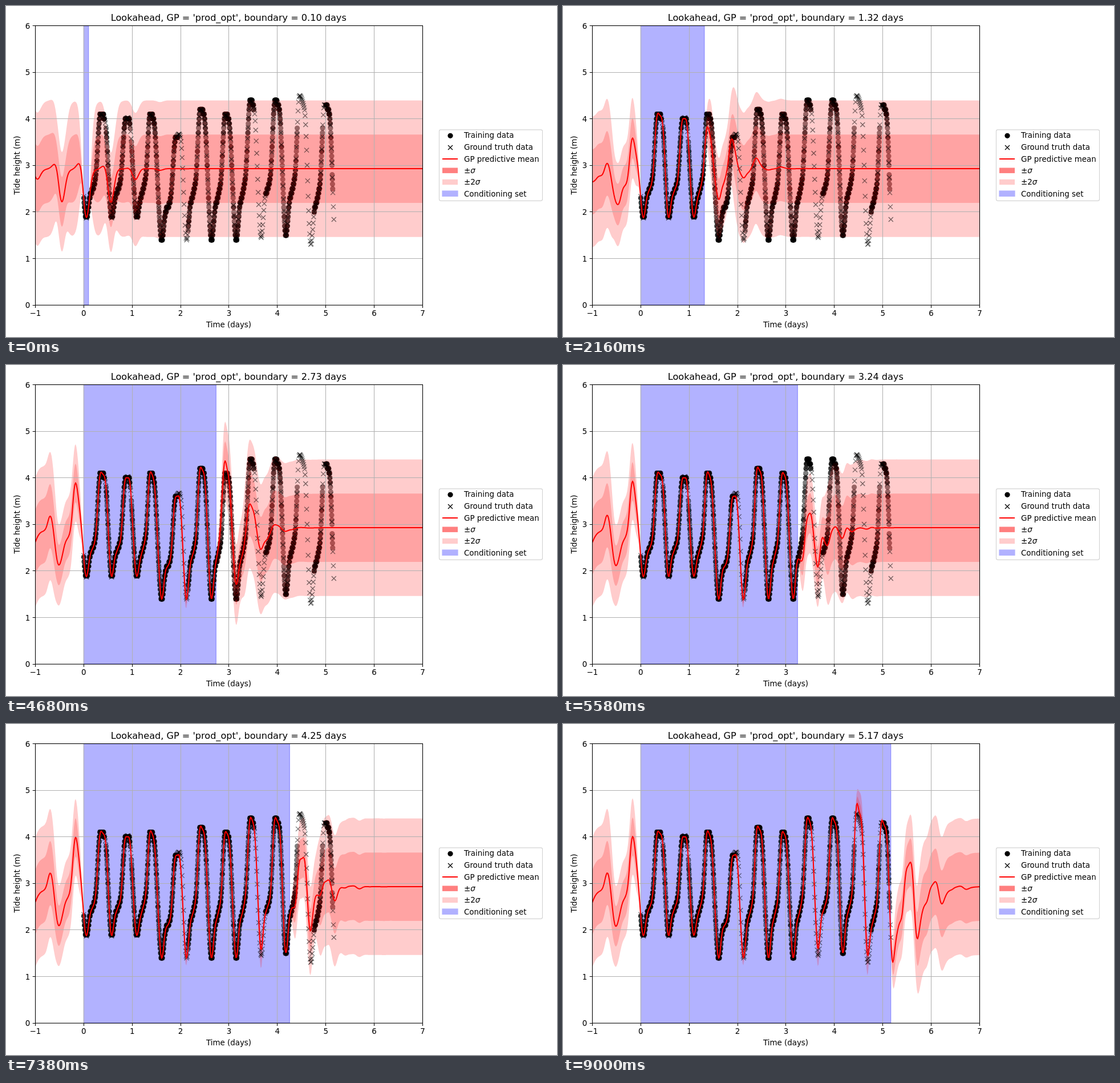
An HTML page with a canvas that plays this animation: 966 by 580 pixels, repeating every 9090 ms.

```html
<!DOCTYPE html>
<html lang="en">
<head>
<meta charset="utf-8">
<title>Tide height lookahead</title>
<style>
  html, body { margin: 0; width: 100%; height: 100%; overflow: hidden; background: #fff; }
  canvas, svg { position: absolute; left: 0; top: 0; width: 966px; height: 580px; }
  text { font: 13.42px "DejaVu Sans", sans-serif; fill: #000; }
  .mid { text-anchor: middle; }
  .end { text-anchor: end; }
  #title { font-size: 16.1px; }
  .it { font-style: oblique; }
</style>
</head>
<body>
<canvas id="plot" width="966" height="580"></canvas>
<svg id="frame" viewBox="0 0 966 580">
  <rect x="51.5" y="34.5" width="679" height="489.7" fill="none" stroke="#000" stroke-width="1.07"/>
  <path id="ticks" stroke="#000" stroke-width="1.07"/>
  <g id="labels"></g>
  <text id="title" class="mid" x="390.3" y="26"></text>
  <text class="mid" x="390.5" y="562.6">Time (days)</text>
  <text class="mid" transform="translate(24 279) rotate(-90)">Tide height (m)</text>
  <rect x="759.5" y="216.8" width="181" height="124.5" rx="2.7" fill="#fff" stroke="#d4d4d4" stroke-width="1.2"/>
  <circle cx="779" cy="227.3" r="4.6"/>
  <path d="M775 244l8 8m0-8l-8 8" stroke="#000" stroke-width="1.3"/>
  <path d="M765 268h27" stroke="#f00" stroke-width="2"/>
  <rect x="765" y="283.5" width="27" height="9.4" fill="#ff7f7f"/>
  <rect x="765" y="303.8" width="27" height="9.4" fill="#fcc"/>
  <rect x="765" y="324" width="27" height="9.4" fill="#00f" stroke="#00f" stroke-width="1.2" opacity=".3"/>
  <text x="803" y="231.4">Training data</text>
  <text x="803" y="252.3">Ground truth data</text>
  <text x="803" y="272.6">GP predictive mean</text>
  <text x="803" y="292.9">±<tspan class="it">σ</tspan></text>
  <text x="803" y="313.2">±2<tspan class="it">σ</tspan></text>
  <text x="803" y="333.5">Conditioning set</text>
</svg>
<script>
const W = 966, H = 580, LEFT = 51.4, TOP = 34.5, RIGHT = 730.4, BOTTOM = 524.2;
const STEP = 90, STEPS = 101, FIRST = 0.1, LAST = 5.166;
const X = t => LEFT + (t + 1) * (RIGHT - LEFT) / 8;
const Y = h => BOTTOM - h * (BOTTOM - TOP) / 6;
const snap = v => Math.floor(v) + .5;

// One tide per row: low time, low, shoulder, late shoulder,
// peak time, peak, end of stand, height there.
const tides = [
  [-.46, 1.8, 2.35, 2.65, -.17, 4, -.11, 3.9],
  [.055, 1.87, 2.38, 2.7, .345, 4.1, .445, 3.93],
  [.575, 1.87, 2.36, 2.68, .865, 4, .945, 3.95],
  [1.095, 1.88, 2.32, 2.75, 1.37, 4.1, 1.45, 3.95],
  [1.61, 1.4, 2.02, 2.3, 1.9, 3.6, 2, 3.6],
  [2.125, 1.4, 2.2, 2.65, 2.405, 4.2, 2.49, 4.05],
  [2.64, 1.4, 2.15, 2.6, 2.92, 4.08, 3, 3.95],
  [3.15, 1.4, 2.2, 2.7, 3.44, 4.4, 3.52, 4.2],
  [3.665, 1.45, 2.35, 2.72, 3.95, 4.38, 4.04, 4.2],
  [4.175, 1.5, 2.3, 2.75, 4.455, 4.5, 4.56, 4.2],
  [4.69, 1.3, 2.1, 2.55, 4.97, 4.3, 5.075, 4.1]
];
const knots = tides.flatMap(([t, low, a, b, tp, hi, te, end]) => [
  [t, low, 0], [t + .085, a, 3], [t + .185, b, 6], [tp, hi, 0], [te, end, -5]
]).concat([[5.2, 1.4, 0]]);

// Cubic Hermite curve through the knots.
function tide(t) {
  let i = 0;
  while (i < knots.length - 2 && knots[i + 1][0] < t) i++;
  const [t0, y0, m0] = knots[i], [t1, y1, m1] = knots[i + 1];
  const d = t1 - t0, u = (t - t0) / d, v = 1 - u;
  return y0 * v * v * (1 + 2 * u) + y1 * u * u * (3 - 2 * u)
    + d * u * v * (m0 * v - m1 * u);
}

// Periods without sensor readings.
const gaps = [[.43, .46], [.96, .985], [1.94, 2.155], [3.515, 3.755],
  [4.41, 4.755], [4.935, 5], [5.145, 6]];
const samples = Array.from({ length: 1490 }, (_, i) => i / 288)
  .map(t => [t, tide(t)]);
const truth = samples.filter((_, i) => i % 3 === 0);
const training = samples
  .filter(([t]) => !gaps.some(([a, b]) => t > a && t < b))
  .map(([t, h]) => [t, Math.round(h * 10) / 10]);

// Gaussian process: periodic times squared-exponential kernel.
const MEAN = 2.93, VAR = .733 ** 2, NOISE = .03 ** 2;
const PERIOD = .515, PER_LEN = 1, LEN = .586;
const kernel = d => VAR * Math.exp(
  -2 * (Math.sin(Math.PI * d / PERIOD) / PER_LEN) ** 2 - d * d / (2 * LEN * LEN));

const obs = training.filter((_, i) => i % 2 === 0);
const L = [];

function solve(rhs, n) {
  const v = new Float64Array(n + 1);
  for (let j = 0; j < n; j++) {
    const row = L[j];
    let s = rhs(j);
    for (let m = 0; m < j; m++) s -= row[m] * v[m];
    v[j] = s / row[j];
  }
  return v;
}
const project = (t, n) => solve(j => kernel(t - obs[j][0]), n);

obs.forEach(([t], i) => {
  const row = project(t, i);
  let s = VAR + NOISE;
  for (let m = 0; m < i; m++) s -= row[m] * row[m];
  row[i] = Math.sqrt(Math.max(s, 1e-9));
  L.push(row);
});
const weights = solve(j => obs[j][1] - MEAN, obs.length);
const GRID = 500;
const tests = Array.from({ length: GRID + 1 }, (_, i) => {
  const t = -1 + 8 * i / GRID;
  return { t, v: project(t, obs.length) };
});

// Observations are in time order, so a prefix of v is the answer for any boundary.
function predict(boundary) {
  let n = obs.findIndex(([t]) => t > boundary);
  if (n < 0) n = obs.length;
  return tests.map(({ t, v }) => {
    let mean = MEAN, left = VAR;
    for (let i = 0; i < n; i++) {
      mean += v[i] * weights[i];
      left -= v[i] * v[i];
    }
    return { x: X(t), mean, sd: Math.sqrt(Math.max(left, 0)) };
  });
}

function layer(paint) {
  const c = document.createElement('canvas');
  c.width = W;
  c.height = H;
  paint(c.getContext('2d'));
  return c;
}
const dots = layer(g => {
  g.fillStyle = 'rgba(0,0,0,.5)';
  for (const [t, h] of training) {
    g.beginPath();
    g.arc(X(t), Y(h), 4.6, 0, 7);
    g.fill();
  }
});
const crosses = layer(g => {
  g.strokeStyle = 'rgba(0,0,0,.55)';
  g.lineWidth = 1.3;
  for (const [t, h] of truth) {
    const x = X(t), y = Y(h);
    g.beginPath();
    g.moveTo(x - 4, y - 4); g.lineTo(x + 4, y + 4);
    g.moveTo(x + 4, y - 4); g.lineTo(x - 4, y + 4);
    g.stroke();
  }
});
const grid = layer(g => {
  g.strokeStyle = '#b0b0b0';
  g.lineWidth = 1.07;
  g.beginPath();
  for (let t = 0; t < 7; t++) {
    g.moveTo(snap(X(t)), TOP); g.lineTo(snap(X(t)), BOTTOM);
  }
  for (let h = 1; h < 6; h++) {
    g.moveTo(LEFT, snap(Y(h))); g.lineTo(RIGHT, snap(Y(h)));
  }
  g.stroke();
  // Grid lines pass behind the dots.
  g.globalCompositeOperation = 'destination-out';
  g.drawImage(dots, 0, 0);
});

const ctx = document.getElementById('plot').getContext('2d');
const title = document.getElementById('title');

function band(pts, k) {
  ctx.beginPath();
  pts.forEach(p => ctx.lineTo(p.x, Y(p.mean + k * p.sd)));
  [...pts].reverse().forEach(p => ctx.lineTo(p.x, Y(p.mean - k * p.sd)));
  ctx.fillStyle = 'rgba(255,0,0,.2)';
  ctx.fill();
}

function draw(step) {
  const boundary = FIRST + (LAST - FIRST) * step / (STEPS - 1);
  const pts = predict(boundary);
  title.textContent = `Lookahead, GP = 'prod_opt', boundary = ${boundary.toFixed(2)} days`;
  ctx.clearRect(0, 0, W, H);
  ctx.save();
  ctx.beginPath();
  ctx.rect(LEFT, TOP, RIGHT - LEFT, BOTTOM - TOP);
  ctx.clip();
  ctx.fillStyle = ctx.strokeStyle = 'rgba(0,0,255,.3)';
  ctx.lineWidth = 1.3;
  ctx.beginPath();
  ctx.rect(X(0), TOP, X(boundary) - X(0), BOTTOM - TOP);
  ctx.fill();
  ctx.stroke();
  ctx.drawImage(dots, 0, 0);
  band(pts, 1);
  band(pts, 2);
  ctx.drawImage(grid, 0, 0);
  ctx.drawImage(crosses, 0, 0);
  ctx.strokeStyle = '#f00';
  ctx.lineWidth = 2;
  ctx.lineJoin = 'round';
  ctx.beginPath();
  pts.forEach(p => ctx.lineTo(p.x, Y(p.mean)));
  ctx.stroke();
  ctx.restore();
}

let ticks = '', labels = '';
for (let t = -1; t <= 7; t++) {
  ticks += `M${snap(X(t))} ${BOTTOM}v4.7`;
  labels += `<text class="mid" x="${X(t)}" y="543">${t < 0 ? '−1' : t}</text>`;
}
for (let h = 0; h <= 6; h++) {
  ticks += `M${LEFT} ${snap(Y(h))}h-4.7`;
  labels += `<text class="end" x="42.3" y="${Y(h) + 5}">${h}</text>`;
}
document.getElementById('ticks').setAttribute('d', ticks);
document.getElementById('labels').innerHTML = labels;

let shown = 0;
draw(0);
const start = performance.now();
function tick(now) {
  const step = Math.floor(Math.max(0, now - start) / STEP) % STEPS;
  if (step !== shown) draw(shown = step);
  requestAnimationFrame(tick);
}
requestAnimationFrame(tick);
</script>
</body>
</html>
```
